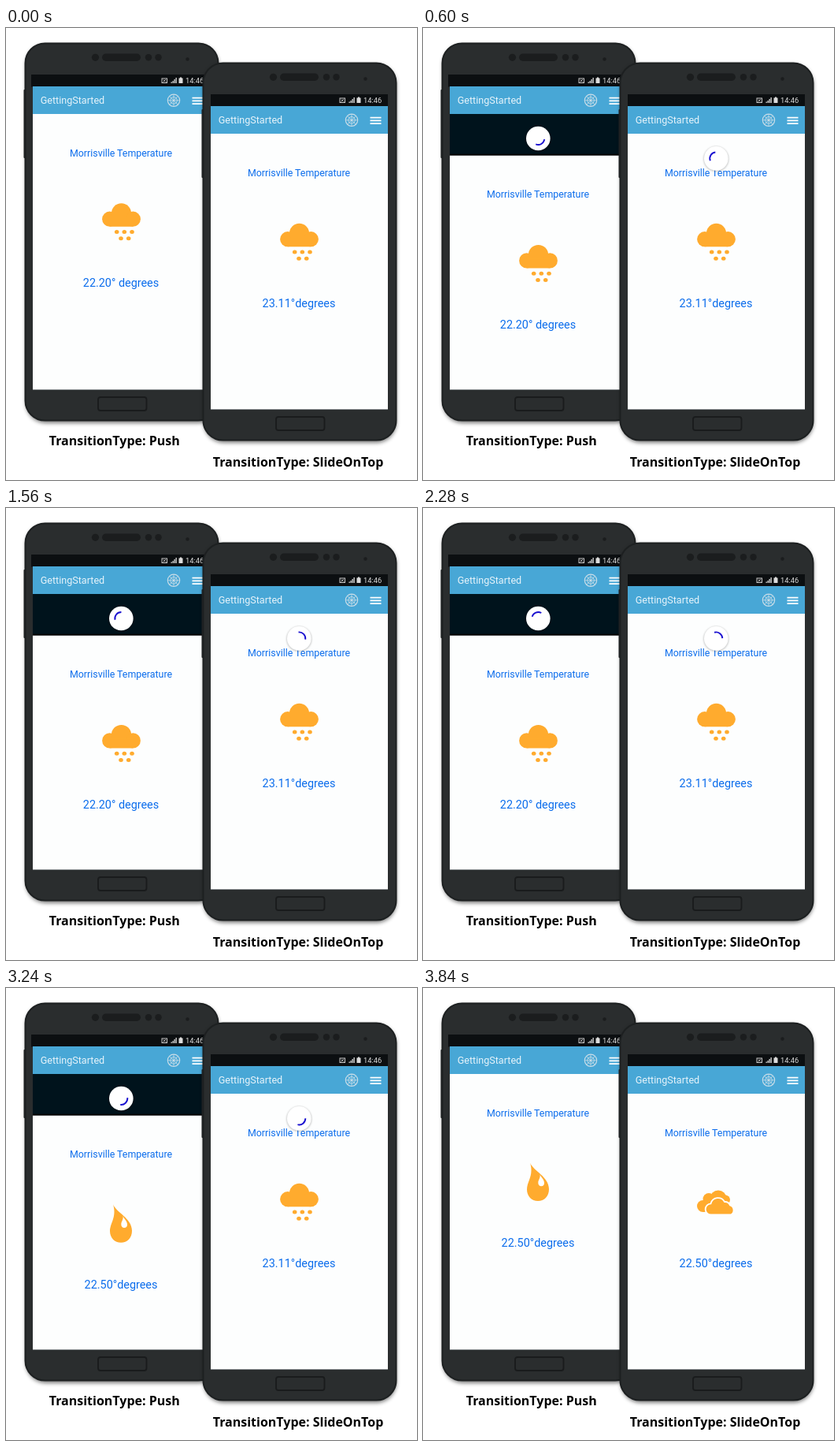
Write an HTML page that moves like this. It is 522x573 px and loops after 3870 ms.

```html
<!DOCTYPE html>
<html lang="en">
<head>
<meta charset="utf-8">
<style>
  html, body { margin: 0; width: 100%; height: 100%; overflow: hidden; background: #fff; }
  svg { display: block; width: 522px; height: 573px; }
  .ui { font-family: Roboto, sans-serif; }
  .caption { font: 700 16px "Open Sans", "Noto Sans", sans-serif; }
</style>
</head>
<body>
<svg id="stage" viewBox="0 0 522 573">
  <defs>
    <filter id="soft" x="-20%" y="-20%" width="140%" height="140%"><feGaussianBlur stdDeviation="2.5"/></filter>
    <filter id="disc" x="-30%" y="-30%" width="160%" height="160%"><feGaussianBlur stdDeviation="1"/></filter>
    <clipPath id="header"><rect x="34" y="74" width="225" height="35"/></clipPath>
    <clipPath id="page"><rect x="34" y="109" width="225" height="349.5"/></clipPath>

    <g id="rain" fill="#ffab2e">
      <circle cx="131.7" cy="242.2" r="9.6"/>
      <circle cx="146.5" cy="234.8" r="12.6"/>
      <circle cx="161.3" cy="242.2" r="9.6"/>
      <rect x="131.7" y="240" width="29.6" height="11.8"/>
      <g id="drops"></g>
    </g>
    <g id="drop">
      <path fill="#ffab2e" d="M136 221.5C140 232 160 239 160 255C160 264 154 270 146 270C138 270 132 264 132 255.500C132 245 141 238 136 221.500Z"/>
      <path fill="#fff" d="M148.500 236C149.500 240 154 242.500 154 247C154 250 152.500 251.300 150.200 251.300C147.800 251.300 146.300 249.500 146.300 247C146.300 243 149.500 241 148.500 236Z"/>
    </g>
    <g id="clouds" fill="#ffab2e">
      <circle cx="129.500" cy="251" r="7.500"/>
      <circle cx="137" cy="242" r="7.500"/>
      <circle cx="149" cy="241.500" r="10.500"/>
      <circle cx="158" cy="243" r="6"/>
      <rect x="129.500" y="244" width="25" height="14.500"/>
      <path id="front" stroke="#fff" stroke-width="1.800" d="M140 262A7 7 0 0 1 139.500 247.800A9.500 9.500 0 0 1 157 245.500A7 7 0 0 1 164 250A6.500 6.500 0 0 1 165 262Z"/>
    </g>
  </defs>
</svg>
<script>
const LOOP = 3870;
const stage = document.getElementById('stage');
const get = id => document.getElementById(id);
const clamp = (x, lo = 0, hi = 1) => Math.min(hi, Math.max(lo, x));
const progress = (t, from, to) => clamp((t - from) / (to - from));
const easeOut = p => Math.sin(p * Math.PI / 2);
const easeInOut = p => (1 - Math.cos(p * Math.PI)) / 2;

get('drops').innerHTML = [[140.7, 258.5], [150.3, 258.5], [160, 258.5], [146, 266.7], [155.7, 266.7]]
  .map(([x, y]) => `<ellipse cx="${x}" cy="${y}" rx="2.8" ry="2.500"/>`).join('');

function polar(r, degrees) {
  const a = degrees * Math.PI / 180;
  return `${(r * Math.cos(a)).toFixed(2)} ${(r * Math.sin(a)).toFixed(2)}`;
}

function wheelIcon() {
  const angles = Array.from({ length: 8 }, (_, i) => i * 45);
  const spokes = angles.map(a => `M${polar(1.5, a)}L${polar(7.7, a)}`).join('');
  const web = 'M' + angles.map(a => polar(4.5, a)).join('L') + 'Z';
  return `<g transform="translate(213 91.8)" fill="none" stroke="#c9dde8">
    <circle r="7.7" stroke-width="1.1"/><path d="${spokes}${web}" stroke-width=".8"/>
    <circle r="1.500" fill="#c9dde8" stroke="none"/></g>`;
}

function shell() {
  return `
    <rect x="25" y="21" width="245" height="480" rx="26" fill="#000" opacity=".5" filter="url(#soft)"/>
    <rect x="22.500" y="78" width="3" height="87" rx="1" fill="#202324"/>
    <rect x="24.500" y="19.500" width="245" height="478" rx="25" fill="#2a2d2e" stroke="#1d2021" stroke-width="2"/>
    <g fill="#1b1d1e">
      <rect x="122" y="32.500" width="49" height="9.500" rx="4.700"/>
      <circle cx="113.500" cy="37.300" r="4.600"/><circle cx="181" cy="37.300" r="4.200"/>
      <circle cx="193.500" cy="37.300" r="4.200"/><circle cx="230.500" cy="39.500" r="2.200"/>
    </g>
    <rect x="117" y="468" width="61.500" height="17" rx="3" fill="none" stroke="#191b1c" stroke-width="1.800"/>`;
}

function bars(statusX) {
  return `
    <rect x="${statusX}" y="59" width="${259 - statusX}" height="15.500" fill="#0c0f11"/>
    <g fill="#dcdcdc">
      <rect x="198" y="64" width="6.500" height="5.500" fill="none" stroke="#c8c8c8"/>
      <path d="M199.500 68.500L203 65M200 65.500L203 68.500" stroke="#c8c8c8" stroke-width=".9"/>
      <path d="M209.500 70v-1.500h1.300v1.500zM211.500 70v-3h1.300v3zM213.500 70v-5h1.300v5zM215.500 70v-7h1.300v7z"/>
      <path d="M219.500 70v-6.500h1.500v-1h2v1h1.500v6.500z"/>
      <text x="228" y="69.800" font-size="9.300">14:46</text>
    </g>
    <rect x="34" y="74" width="225" height="35" fill="#48a7d6"/>
    <g clip-path="url(#header)"><circle class="ripple" cx="212.500" cy="92" fill="#1f6189"/></g>
    <text x="43.700" y="96.300" font-size="12.600" fill="#e6f3fa">GettingStarted</text>
    ${wheelIcon()}
    <path d="M236.500 88.700h14M236.500 92.400h14M236.500 96.100h14" stroke="#fff" stroke-width="1.800"/>`;
}

function addPhone(x, y, statusX, nudge) {
  const g = document.createElementNS('http://www.w3.org/2000/svg', 'g');
  g.setAttribute('class', 'ui');
  g.setAttribute('transform', `translate(${x} ${y})`);
  g.innerHTML = `${shell()}
    <g clip-path="url(#page)">
      <rect x="34" y="109" width="225" height="350" fill="#00131c"/>
      <g class="content">
        <rect x="34" y="107" width="225" height="2" fill="#000"/>
        <rect x="34" y="109" width="225" height="350" fill="#fdfefe"/>
        <g transform="translate(0 ${nudge})" text-anchor="middle" fill="#0a6cec">
          <text x="146" y="162.700" font-size="12.400">Morrisville Temperature</text>
          <use class="weather"/>
          <text class="degrees" x="146" y="328.300" font-size="14.400"></text>
        </g>
      </g>
      <g class="spinner">
        <circle r="16" cy=".6" fill="#000" opacity=".22" filter="url(#disc)"/>
        <circle r="15.300" fill="#fff"/>
        <path class="arc" fill="none" stroke="#1a10d0" stroke-width="1.900"/>
      </g>
    </g>
    ${bars(statusX)}`;
  stage.append(g);
  const part = name => g.querySelector('.' + name);
  return {
    setRipple(t) {
      part('ripple').setAttribute('r', 22 * easeOut(progress(t, 30, 240)));
      part('ripple').setAttribute('opacity', .2 * (1 - progress(t, 300, 540)));
    },
    setContent(shift, icon, text) {
      part('content').setAttribute('transform', `translate(0 ${shift})`);
      part('weather').setAttribute('href', '#' + icon);
      part('degrees').textContent = text;
    },
    setSpinner(visible, cy, middle) {
      part('spinner').setAttribute('visibility', visible ? 'visible' : 'hidden');
      part('spinner').setAttribute('transform', `translate(146.300 ${cy})`);
      part('arc').setAttribute('d', `M${polar(8, middle - 52)}A8 8 0 0 1 ${polar(8, middle + 52)}`);
    }
  };
}

function addCaption(x, y, text) {
  const label = document.createElementNS('http://www.w3.org/2000/svg', 'text');
  label.setAttribute('class', 'caption');
  label.setAttribute('x', x);
  label.setAttribute('y', y);
  label.textContent = text;
  stage.append(label);
}

const push = addPhone(0, 0, 32, 0);
const slide = addPhone(226, 25, 34, .5);
addCaption(54.7, 529.3, 'TransitionType: Push');
addCaption(262.7, 555.8, 'TransitionType: SlideOnTop');

function draw(t) {
  push.setRipple(t);
  slide.setRipple(t);

  const open = easeOut(progress(t, 90, 420)) - easeInOut(progress(t, 3270, 3600));
  const refreshed = t >= 3150;
  push.setContent(52.7 * open, refreshed ? 'drop' : 'rain', refreshed ? '22.50°degrees' : '22.20° degrees');
  push.setSpinner(t >= 420 && t < 3270, 140, 60 + .54 * (t - 600));

  const down = easeOut(progress(t, 90, 300)) - easeInOut(progress(t, 3330, 3600));
  const updated = t >= 3330;
  slide.setContent(0, updated ? 'clouds' : 'rain', updated ? '22.50°degrees' : '23.11°degrees');
  slide.setSpinner(down > 0, 90 + 50.4 * down, 65 + .485 * (t - 300));
}

function tick() {
  draw(performance.now() % LOOP);
  requestAnimationFrame(tick);
}
tick();
</script>
</body>
</html>
```
